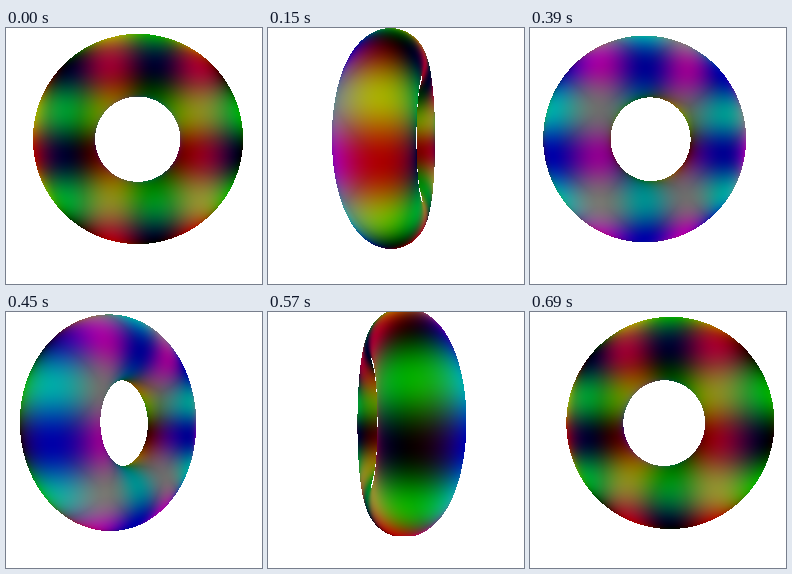
Recreate the animation shown at these times as an HTML page with a canvas. Size 256 by 256 pixels, loop 0.72 s.

```html
<!DOCTYPE html>
<html lang="en">
<head>
<meta charset="utf-8">
<title>Spinning torus</title>
<style>
  html, body { margin: 0; width: 100%; height: 100%; overflow: hidden; background: #fff; }
  canvas { display: block; width: 256px; height: 256px; }
</style>
</head>
<body>
<canvas id="stage" width="256" height="256"></canvas>
<script>
const STEPS = 24, STEP_MS = 30;
const SIZE = 256, VIEW_H = 224, HORIZON = 114;
const CAMERA = 235, FOCAL = 223;
const RING = 75.5, TUBE = 30.5;
const CENTER = { x: 3.9, y: -3, z: 3 };
const WAVE = 80, DARK = 15, LEVEL = 172;

const ctx = document.getElementById('stage').getContext('2d');
const cache = [];

// Each axis drives one colour channel with the same wave.
const tint = v => (1 - Math.cos((v - DARK) * 2 * Math.PI / WAVE)) / 2;

// Greys and the inner side of the ring are a little darker.
function paint(px, k, x, y, z, q) {
  const r = tint(x), g = tint(y), b = tint(z);
  const light = LEVEL * (0.9 + 0.12 * q / TUBE) * (1 - 0.25 * Math.min(r, g, b));
  px[k] = r * light;
  px[k + 1] = g * light;
  px[k + 2] = b * light;
}

function render(step) {
  const img = ctx.createImageData(SIZE, SIZE);
  const px = img.data.fill(255);
  const angle = step * 2 * Math.PI / STEPS;
  const c = Math.cos(angle), s = Math.sin(angle);
  const ox = -CAMERA * s - CENTER.x, oy = -CENTER.y, oz = CAMERA * c - CENTER.z;

  for (let row = 0; row < VIEW_H; row++) {
    for (let col = 0; col < SIZE; col++) {
      const u = (col + 0.5 - SIZE / 2) / FOCAL;
      const v = (row + 0.5 - HORIZON) / FOCAL;
      const n = 1 / Math.sqrt(u * u + v * v + 1);
      const dx = (u * c + s) * n, dy = v * n, dz = (u * s - c) * n;

      // March the ray, in torus space, to the surface.
      for (let t = 115, i = 0; t < 380 && i < 60; i++) {
        const x = ox + dx * t, y = oy + dy * t, z = oz + dz * t;
        const q = Math.sqrt(x * x + y * y) - RING;
        const d = Math.sqrt(q * q + z * z) - TUBE;
        if (d < 0.1) {
          paint(px, (row * SIZE + col) * 4, x, y, z, q);
          break;
        }
        t += d;
      }
    }
  }
  return img;
}

let shown = -1;
const start = performance.now();

function tick() {
  const step = Math.floor((performance.now() - start) / STEP_MS) % STEPS;
  if (step !== shown) {
    cache[step] = cache[step] || render(step);
    ctx.putImageData(cache[step], 0, 0);
    shown = step;
  }
  requestAnimationFrame(tick);
}
tick();
</script>
</body>
</html>
```
